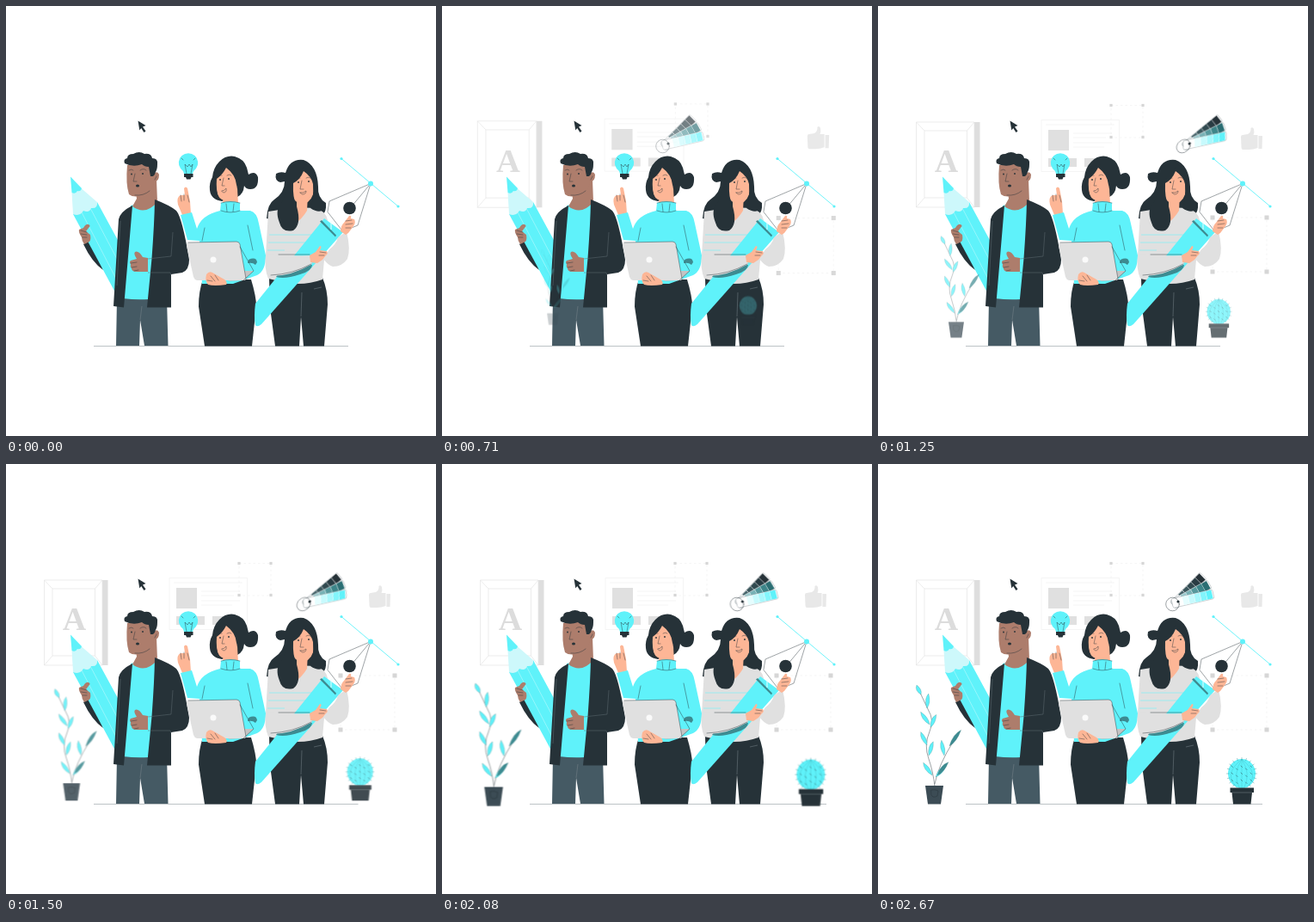
An HTML page for the animation above (2710 ms loop, 500 by 500 pixels).

```html
<!DOCTYPE html>
<html lang="en">
<head>
<meta charset="utf-8">
<title>Design team</title>
<style>
html, body { margin: 0; width: 100%; height: 100%; overflow: hidden; background: #fff; }
svg { display: block; width: 100vw; height: 100vh; }
#backdrop, #swatch, #plants { transform-box: view-box; opacity: 0; }
#backdrop { transform-origin: 247px 213px; }
#swatch { transform-origin: 363px 148px; }
#plants { transform-origin: 239px 328px; }
.t { fill: #5ff2fa; } .d { fill: #263238; } .g { fill: #e0e0e0; }
.m { fill: #ad7d6c; } .s { fill: #fdb696; } .w { fill: #fff; }
.l { fill: none; stroke: #263238; stroke-width: .45; stroke-linecap: round; stroke-linejoin: round; }
.p { fill: none; stroke: #e4e4e4; stroke-width: .7; }
.f { fill: none; stroke: #eee; stroke-width: .6; }
.k { fill: none; stroke: #7b878d; stroke-width: .5; }
.c { fill: none; stroke: #5ff2fa; stroke-width: .9; }
</style>
</head>
<body>
<svg viewBox="0 0 500 500">
  <g id="backdrop">
    <path fill="#dedede" d="M112 135h6.500v99h-6.500z"/>
    <path class="p" d="M44.500 135h67.500v99h-67.500zM54 145h49.500v78h-49.500zM44.500 135l9.500 10M112 135l-8.500 10M44.500 234l9.500-11M112 234l-8.500-11"/>
    <text x="79.500" y="193" text-anchor="middle" font-family="'Liberation Serif', serif" font-weight="700" font-size="38" fill="#dcdcdc">A</text>
    <path class="f" d="M190 132.500h90.500v60h-90.500zM195 138h80M227 148h45M227 153h38M227 159h45M227 164h36"/>
    <path class="g" d="M198 144h24v24h-24zM198 177h14v10h-14zM219 177h12v10h-12zM240 177h18v10h-18z"/>
    <path class="f" stroke-dasharray="2.500 3" d="M271 115.500h37v37.500h-37zM389 246h63v63h-63z"/>
    <g id="handles" fill="#d6d6d6"></g>
    <path fill="#e8e8e8" d="M422 152q0-2 2-2l6-1q4-2 3.500-7 2-2 3.500 1 1 4-.5 7h5v15q-5 2-10 2h-7q-2 0-2-3zM442.500 151h4.500l-.5 15h-4z"/>
  </g>

  <path class="k" d="M102 395.500H398"/>
  <path id="ground" class="k" d="M398 395.500H447"/>
  <path id="groundLeft" class="k" d="M98 395.500H102"/>
  <path class="d" d="M153.500 133.500l9 5.500-3.500 1.500 3.500 5-2 1.500-3.300-5-1.900 2.500z"/>

  <g id="man">
    <path class="d" d="M90 277l6-4 12 21 5 13q-13-9-23-30z"/>
    <path class="t" d="M78 242l28-14 25 46 1 68-5-9z"/>
    <path fill="#cdf8fb" d="M76.500 217l11-5L106 228q1 8-7 7-2 6-9 3-4 7-12 4z"/>
    <path class="t" d="M75 198.500l13 13.500q-1 4-5 3-2 4-6.500 2z"/>
    <path fill="none" stroke="#b9fafd" stroke-width=".6" d="M88 240l40 77M98 235l31 59"/>
    <path class="m" d="M91 277q-3-4-3-8-4-6-3-9l5-2q3-5 6-4 3 1 0 4l-3 4 5 4q1 6-1 8z"/>
    <path class="l" d="M87 261l7 2M87 265l7 1M89 269l5 0"/>
    <path fill="#455a64" d="M129 340h58l1.500 55H161l-5-30-1 30h-27z"/>
    <path class="k" stroke="#263238" d="M156 365l2-16"/>
    <path class="t" d="M145 232l28-6v60l-7 55q-15 1-30-1z"/>
    <path class="m" d="M150 210l25-8 1 26q-14 16-29 5l5-9z"/>
    <path class="d" d="M147 232q-14 7-16 16l-6 101 12 1.500zM173 225q18 7 25 13 7 8 15 57 0 12-8 15l-13 2v38.500h-28l5.500-57q3-40 3.500-68.500z"/>
    <path fill="none" stroke="#5e6d73" stroke-width=".5" d="M194 263l-2 28-27 3M192 313l-1-3-26 0M133 250l-4 75"/>
    <path class="m" d="M165 293l-6-1q-5-8-9-6-2 2 2 8l-7 2q-2 2 0 4-1 3 1 5 0 4 6 4l13 0z"/>
    <path class="l" d="M145 299l7-1M146 304l6-1M149 308l5-1"/>
    <path class="m" d="M141 185q15-6 30-1l1 11q4-4 6 1 0 8-6 9-2 10-9 14-14 5-20 0-4-12-2-34z"/>
    <path class="d" d="M138 183q-2-5 3-6 0-5 7-5 7-4 13 0 8-1 9 5 7 0 6 7 0 6-2 9-1 4-3 5l-3 0-2-11q-5 0-8-3-10 4-20-1z"/>
    <path class="l" d="M143 191q3-2 5 0M156 191q4-3 7 0M150 195l-2 9 4 0M150 220q10 1 17-5M175 198l-2 4" stroke-width=".7"/>
    <circle class="d" cx="146" cy="195.500" r=".9"/><circle class="d" cx="159" cy="195" r=".9"/>
    <ellipse class="d" cx="153" cy="209" rx="2" ry="1.500"/>
  </g>

  <g id="lamp">
    <path class="t" d="M207 195q-1-4-4-6a11.200 11.200 0 1 1 18 0q-3 2-4 6z"/>
    <path class="d" d="M207 195h10.500v4l-2 0-1 2.500h-4.500l-1-2.500h-2z"/>
    <path class="l" stroke-width=".3" d="M210 195l-2-11 3 3 2-3 2 3 2-3-2 11M206 179l-2-2M218 179l2-2"/>
  </g>

  <g id="maker">
    <path class="d" d="M237 214q-1-8 3-15 1-11 8-18 8-8 18-6 11 3 14 13l2 8q8-5 11 3 1 14-9 14-5 0-7-4-1 10-8 13l-18 5q-13-2-14-13z"/>
    <path class="s" d="M253 214l16-2 1 19-9 7-9-6z"/>
    <path class="s" d="M244 196q8-5 12-11 9 4 12 14 2 3 1 11-1 14-9 17-11 0-14-8-3-9-2-23z"/>
    <path class="d" d="M241 205q2-15 15-22 11 5 14 20l3 11q-4 0-5-6-1-12-12-20-4 8-11 13-1 13 2 21-6-3-6-17z"/>
    <path class="l" d="M247 198q2-2 4-1M257 197q3-2 5 0M253 200l-2 9 3 0" stroke-width=".7"/>
    <circle class="d" cx="249" cy="202" r=".9"/><circle class="d" cx="259" cy="201" r=".9"/>
    <path class="w l" d="M251 215q3 0 5-3 1 5-3 5z"/>
    <path class="d" d="M229 318h56q6 20 6 31l-5 46.500h-55l-7-46q0-18 5-31.500z"/>
    <path class="s" d="M205 243l-5-12q-2-9 3-11l5 0-1-8q2-3 4 0l3 15 1 15z"/>
    <path class="l" d="M203 220l1 7M207 219l0 7M211 220l2 8"/>
    <path class="t" d="M203 243l13-3 6 19q5-16 27-21l1-9q11-4 22 0l0 9 12 0q8 2 10 15l8 37q0 18-10 23l-28 10h-36l-3-50-14-1q-4-14-8-29z"/>
    <path class="l" d="M250 229q11-3 22 0M250 238q11 4 22 0M256 230l1 9M265 230l-1 9M231 258l-3 15M281 255l6 29"/>
    <path fill="#3d8b91" d="M282 295q9-4 10 3l-2 3q-3-3-9-2z"/>
    <path fill="#c4c4c4" d="M278 308l10 0-12 11-18 1z"/>
    <path class="g" d="M212 275l56-1q3 0 4 3l7 40q0 2-3 2l-54 0q-3-1-4-4l-8-36q0-4 2-4z"/>
    <path class="l" stroke-width=".4" d="M212 275l56-1q3 0 4 3l7 40M272 280l16 28-12 11"/>
    <circle cx="241" cy="295" r="3.500" fill="#fafafa"/>
    <path class="s" d="M233 312q3-4 7-2l14 8q4 3 2 6-14 2-21 0-4-4-2-12z"/>
    <path class="l" d="M234 319l6 1M238 314l5 6M243 313l4 6"/>
  </g>

  <g id="artist">
    <path class="d" d="M325 194q-6-2-11 1-2 8 5 10l5-1q0 13-12 21-8 5-9 22l24 5 40-8q6-4 5-15-10-6-9-19-1-25-17-31-16-2-21 15z"/>
    <path class="d" d="M306 317l62-1q6 14 6 31l-4 48.500h-24l-3-34-2 34h-28l-6-45z"/>
    <path class="k" d="M343 361l1-28M367 327l-9 2"/>
    <path class="g" d="M305 239l32-5 22 1q13 3 15 14l-6 69q-25 9-50 2l-13-3q-5-12-3-27z"/>
    <path class="c" stroke-width=".5" opacity=".6" d="M306 266h56M305 275h48M304 284h20"/>
    <path class="s" d="M338 221l13-2-1 19q-5 8-10 12-3-7-2-14z"/>
    <path class="s" d="M333 203q6 0 13-13 11 4 13 15 0 17-8 23-12 5-17-5z"/>
    <path class="d" d="M331 203q9-5 15-16 14 5 14 20 2 21 11 27-5 9-17 1 4-9 3-28-2-9-11-15-4 10-12 14-1 16 4 27 6 21-4 28-13 3-16-9-6-15 3-24z"/>
    <path class="l" d="M337 201q3-2 5-1M349 200q3-2 5 0M344 203l-2 10 4 0" stroke-width=".7"/>
    <circle class="d" cx="340" cy="205" r=".9"/><circle class="d" cx="352" cy="204" r=".9"/>
    <path class="w l" d="M342 217q4 1 7-2 0 4-4 4z"/>
    <path class="w l" d="M374 239l2-12 48-20.500-15 48.500-17 7z"/>
    <path class="l" d="M424 206.500l-20 24"/>
    <circle class="d" cx="399.500" cy="235" r="7.300"/>
    <path class="c" d="M390 177.500L456 233"/>
    <g class="t"><circle cx="390" cy="177.500" r="1.600"/><circle cx="424" cy="206.500" r="3"/><circle cx="456" cy="233" r="1.600"/></g>
    <path class="t" d="M370 247l22 16-95 107q-5 4-7 1-2-10 0-25z"/>
    <path fill="#3d8b91" d="M367 249l17 17.500-1 2-18-18z"/>
    <path fill="none" stroke="#e9ffff" d="M378 250l0 10"/>
    <path fill="#3d8b91" d="M314 315q5-11 42-14 0 7-14 11-18 6-28 3z"/>
    <path class="g" d="M386 269l10-7q5 21 1 32-6 9-17 9-6-2-11-9l7-11q8-6 10-14zM304 289q24 2 49 1l3 10q-24 14-47 14-8-6-5-25z"/>
    <path class="l" stroke-width=".3" d="M317 289h36M308 313q25-1 47-13"/>
    <path class="s" d="M353 290l7-4 5-7q3 0 0 5l8 1q2 3-1 5l-4 5-6 4-8-1zM389 262q1-8 4-10l6-8q3-1 2 3l4 1q2 4-1 8l-6 8-3 2z"/>
    <path class="l" d="M365 286l7 1M364 290l6 0M395 250l7-1M395 254l8-1M395 258l6 0"/>
  </g>

  <g id="swatch">
    <g id="blades"></g>
    <circle class="l" cx="342.500" cy="163" r="7.800" stroke-width=".7"/>
    <circle class="d" cx="349" cy="160" r="1.600"/>
  </g>

  <g id="plants">
    <path class="l" d="M66 375q-2-18-7-32-6-16 1-32 6-13-2-26l-9-19M66 372q4-22 22-50"/>
    <g id="leaves"></g>
    <path fill="#3c4c55" d="M55 374h21l-3 21.500h-15z"/>
    <path class="l" d="M62 379q4-1 8 1l-1 6q-5 3-7-1z"/>
    <ellipse class="t" cx="423" cy="360" rx="16" ry="17"/>
    <g id="cactus" class="l"></g>
    <path class="d" d="M409.500 376.500h27.500v5.500h-2l-1.500 13.500h-20.500l-1.500-13.500h-2z"/>
    <path class="k" d="M412 382h23"/>
  </g>
</svg>
<script>
const LOOP = 2710;
const SPRING = 'cubic-bezier(.36,-.01,.5,1.38)';
const $ = id => document.getElementById(id);

function add(parent, tag, attrs) {
  const el = document.createElementNS('http://www.w3.org/2000/svg', tag);
  for (const k in attrs) el.setAttribute(k, attrs[k]);
  return $(parent).appendChild(el);
}

// Corner handles of the two dashed selections.
for (const [x, y, size, r] of [[271, 115.5, 37, 1.6], [389, 246, 63, 2.5]])
  for (const i of [0, 1])
    for (const j of [0, 1])
      add('handles', 'rect', { x: x + i * size - r, y: y + j * size - r, width: 2 * r, height: 2 * r });

// Colour fan: each blade is a row of cells turned about the rivet.
const fan = [
  [-45, ['#46656b', '#3c585e', '#314a50', '#293c43', '#263238']],
  [-29, ['#9ccbcf', '#78b2b6', '#56999d', '#3d8589', '#2b6e73']],
  [-13, ['#e5fdfe', '#c7fafd', '#a8f7fc', '#82f5fb', '#5ff2fa']]
];
for (const [turn, colors] of fan) {
  const transform = `rotate(${turn} 347 161)`;
  add('blades', 'rect', { x: 342, y: 155.5, width: 49, height: 11, rx: 2, fill: '#fff', stroke: '#8b9599', 'stroke-width': .4, transform });
  colors.forEach((fill, i) =>
    add('blades', 'rect', { x: 355 + i * 7, y: 156, width: 6.6, height: 10, fill, transform }));
}

// Leaves: base point, angle, length.
const leaves = [
  [50, 268, -115, 12], [57, 284, -84, 17], [60, 303, -125, 18], [61, 306, -65, 16],
  [57, 327, -115, 17], [59, 339, -72, 17], [63, 362, -125, 18], [67, 364, -48, 19],
  [77, 339, -100, 18], [83, 328, -54, 23], [69, 362, -50, 20]
];
leaves.forEach(([x, y, a, n], i) => add('leaves', 'path', {
  d: `M0 0Q${n * .6}-5 ${n} 0Q${n * .4} 4 0 0`,
  fill: i > 8 ? '#3d8b91' : '#5ff2fa',
  stroke: '#37777c', 'stroke-width': .25,
  transform: `translate(${x} ${y}) rotate(${a})`
}));

// Cactus ribs, ticks and rim spikes.
for (let i = -2; i <= 2; i++) {
  add('cactus', 'path', { d: `M423 343.500Q${423 + i * 11} 360 ${423 + i * 3} 376`, stroke: '#48c4cc' });
  for (let j = 0; j < 3; j++)
    add('cactus', 'path', { d: `M${422 + i * 5.5} ${351 + j * 8 + (i & 1) * 3}l1.500 1.500` });
}
for (let i = 0; i < 20; i++) {
  const a = i * Math.PI / 10, c = Math.cos(a), s = Math.sin(a);
  if (s < .9) add('cactus', 'path', { d: `M${423 + 15 * c} ${360 + 16 * s}L${423 + 17.5 * c} ${360 + 18.5 * s}`, stroke: '#2f8f97' });
}

// Steps are [ms, style, easing towards the next step].
function play(id, steps) {
  const last = steps[steps.length - 1][1];
  const frames = steps.map(([ms, style, easing = 'linear']) => ({ ...style, easing, offset: ms / LOOP }));
  if (steps[0][0] > 0) frames.unshift({ ...steps[0][1], offset: 0 });
  frames.push({ ...last, offset: 1 });
  const run = $(id).animate(frames, { duration: LOOP, iterations: Infinity });
  run.startTime = document.timeline.currentTime;
}

play('backdrop', [
  [100, { transform: 'scale(1.21)', opacity: 0 }, SPRING],
  [1100, { transform: 'scale(1)', opacity: 1 }]
]);
play('plants', [
  [0, { transform: 'scale(.5)', opacity: 0 }, SPRING],
  [2600, { transform: 'scale(1)', opacity: 1 }]
]);
play('swatch', [
  [0, { transform: 'translateX(-250px) skewX(20deg)', opacity: 0 }, SPRING],
  [1560, { transform: 'translateX(0px) skewX(-10deg)', opacity: 1 }, SPRING],
  [2080, { transform: 'translateX(0px) skewX(2deg)', opacity: 1 }, SPRING],
  [2600, { transform: 'translateX(0px) skewX(0deg)', opacity: 1 }]
]);
play('ground', [
  [1400, { clipPath: 'inset(-2px 49px -2px 0px)' }],
  [1750, { clipPath: 'inset(-2px 9px -2px 0px)' }],
  [1950, { clipPath: 'inset(-2px 0px -2px 0px)' }]
]);
play('groundLeft', [
  [1500, { opacity: 0 }],
  [1750, { opacity: 1 }],
  [1950, { opacity: 0 }]
]);
</script>
</body>
</html>
```
